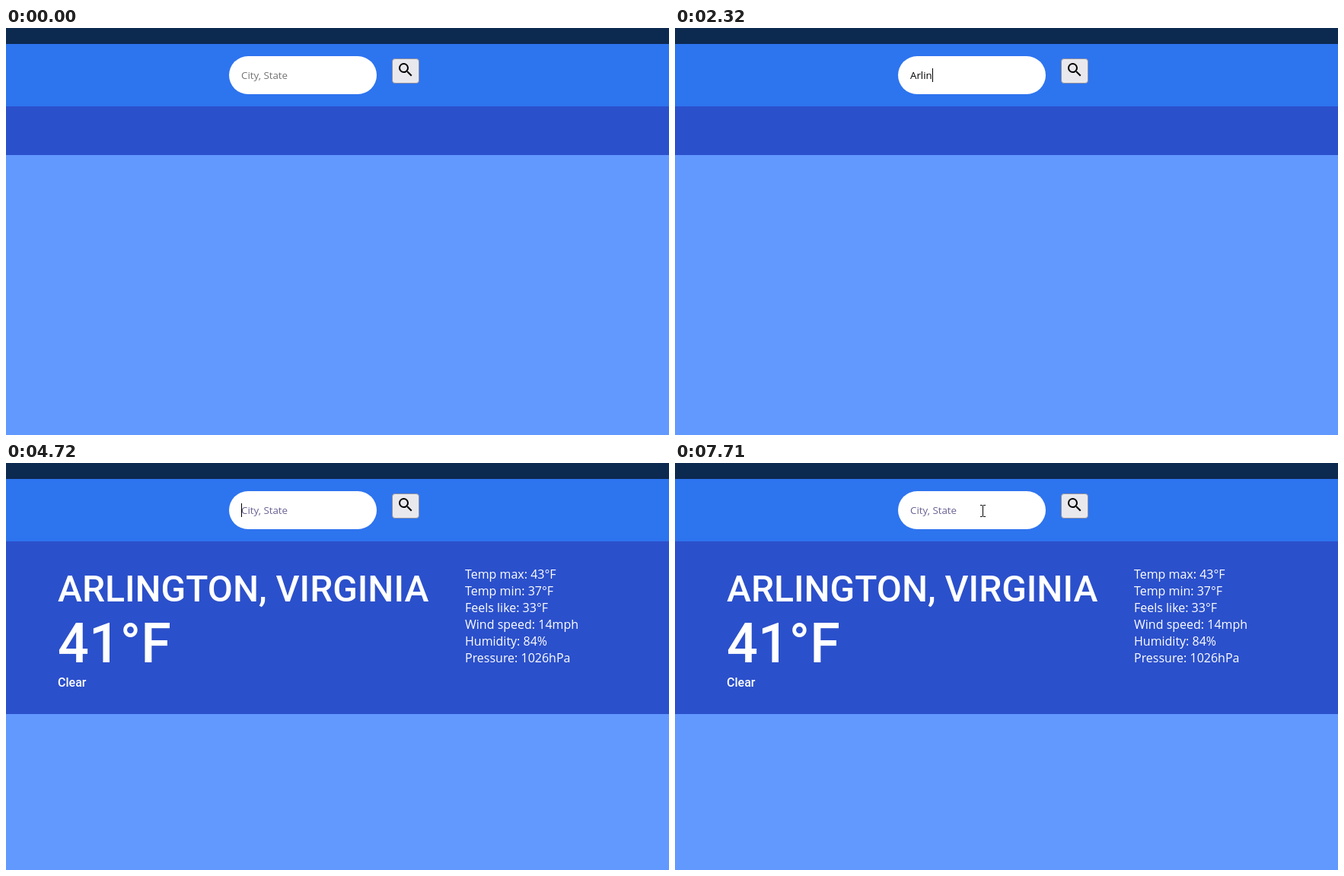
Recreate the animation shown at these times as an HTML page. Size 871 by 535 pixels, loop 8000 ms.

```html
<!DOCTYPE html>
<html lang="en">
<head>
<meta charset="utf-8">
<title>Weather search</title>
<style>
  html, body { margin: 0; width: 100%; height: 100%; overflow: hidden; background: #6199ff; }
  svg { position: absolute; left: 0; top: 0; display: block; }
  #field {
    position: absolute; left: 309px; top: 53px; height: 18px;
    font: 13.333px/18px "Open Sans", sans-serif; color: #000; white-space: pre;
  }
  #hint { position: absolute; left: 0; top: 0; color: #757575; }
  #hint.used { color: #6c6394; }
  #caret { position: relative; z-index: 1; display: inline-block; width: 1px; height: 18px; margin-right: -1px; vertical-align: top; background: #000; }
  .place { font: 500 48px Roboto, sans-serif; }
  .temp { font: 500 72px Roboto, sans-serif; }
  .sky { font: 500 16px Roboto, sans-serif; }
  #facts { font: 16px "Open Sans", sans-serif; }
  #button rect { fill: #e9e9ed; stroke: #8f8f9d; }
  #button.busy rect { fill: #8baeee; stroke: #6d8fd6; }
  #button.busy path { fill: #69696f; }
</style>
</head>
<body>
<svg width="871" height="535">
  <rect width="871" height="21" fill="#0c2950"/>
  <rect y="21" width="871" height="82" fill="#2d74ef"/>
  <rect id="panel" y="103" width="871" height="64" fill="#2b50cb"/>
  <rect x="293" y="37" width="194" height="50" rx="25" fill="#fff"/>
  <g id="button">
    <rect x="507.5" y="40.5" width="35" height="32" rx="3.5"/>
    <path transform="translate(513 43)" d="M15.5 14h-.79l-.28-.27A6.47 6.47 0 0 0 16 9.5 6.5 6.5 0 1 0 9.5 16c1.61 0 3.09-.59 4.23-1.57l.27.28v.79l5 4.99L20.49 19zm-6 0C7.01 14 5 11.99 5 9.5S7.01 5 9.5 5 14 7.01 14 9.5 11.99 14 9.5 14z"/>
  </g>
  <g id="result" fill="#fff">
    <text class="place" x="68" y="182">ARLINGTON, VIRGINIA</text>
    <text class="temp" x="68" y="262">41°F</text>
    <text class="sky" x="68" y="294">Clear</text>
    <g id="facts"></g>
  </g>
</svg>
<div id="field"><span id="typed"></span><i id="caret"></i><span id="hint">City, State</span></div>
<svg width="871" height="535">
  <path id="arrow" d="M.5 .5V16.5L4.3 13L6.8 18.5L9 17.5L6.6 12.2H11.5Z" fill="#fff" stroke="#000"/>
  <path id="beam" shape-rendering="crispEdges" d="M-3-8h3v1h1v-1h3v1h-3v14h3v1h-3v-1h-1v1h-3v-1h3v-14h-3z"/>
</svg>
<script>
const $ = id => document.getElementById(id);
const LOOP = 8000, BUSY = 4250, LOADED = 4720;
const query = "Arlington, Virginia";
const keys = [1390, 1720, 1990, 2190, 2320, 2450, 2590, 2720, 2850, 2980,
  3110, 3240, 3370, 3440, 3510, 3640, 3710, 3850, 3920];
// Caret switches on and off in turn
const blinks = [730, 1260, 1390, 3990, 4520, 5050, 5580, 6130, 6460, 6660, 7190, 7710];
// time, shape, x, y
const moves = [
  [0, ""], [70, "arrow", 652, 480], [130, "arrow", 603, 412], [200, "arrow", 525, 300],
  [260, "arrow", 450, 198], [330, "arrow", 392, 119], [400, "beam", 372, 76],
  [460, "beam", 366, 54], [530, "beam", 364, 58], [600, "beam", 364, 62], [1460, ""],
  [5660, "beam", 364, 64], [5730, "beam", 366, 76], [5790, "beam", 367, 88],
  [5860, "arrow", 378, 118], [5920, "beam", 387, 143], [5990, "beam", 389, 144],
  [6060, "arrow", 395, 122], [6130, "arrow", 400, 98], [6190, "beam", 403, 78],
  [6260, "beam", 404, 68], [6330, "beam", 404, 63]
];
const facts = ["Temp max: 43°F", "Temp min: 37°F", "Feels like: 33°F",
  "Wind speed: 14mph", "Humidity: 84%", "Pressure: 1026hPa"];
$("facts").innerHTML = facts.map((s, i) => `<text x="603" y="${152 + 22 * i}">${s}</text>`).join("");

const passed = (times, t) => times.filter(v => v <= t).length;
const show = (el, on) => { el.style.visibility = on ? "visible" : "hidden"; };

function draw(t) {
  const loaded = t >= LOADED;
  const count = loaded ? 0 : passed(keys, t);
  $("typed").textContent = query.slice(0, count);
  show($("hint"), count === 0);
  $("hint").classList.toggle("used", loaded);
  show($("caret"), passed(blinks, t) % 2);
  $("button").classList.toggle("busy", t >= BUSY && !loaded);
  $("panel").setAttribute("height", loaded ? 227 : 64);
  show($("result"), loaded);

  const [, shape, x, y] = moves[passed(moves.map(m => m[0]), t) - 1];
  for (const id of ["arrow", "beam"]) {
    show($(id), id === shape);
    if (id === shape) $(id).setAttribute("transform", `translate(${x} ${y})`);
  }
  $("beam").setAttribute("fill", y > 103 ? "#c3c9ea" : "#000");
}

const start = performance.now();
function tick() {
  draw((performance.now() - start) % LOOP);
  requestAnimationFrame(tick);
}
tick();
</script>
</body>
</html>
```
